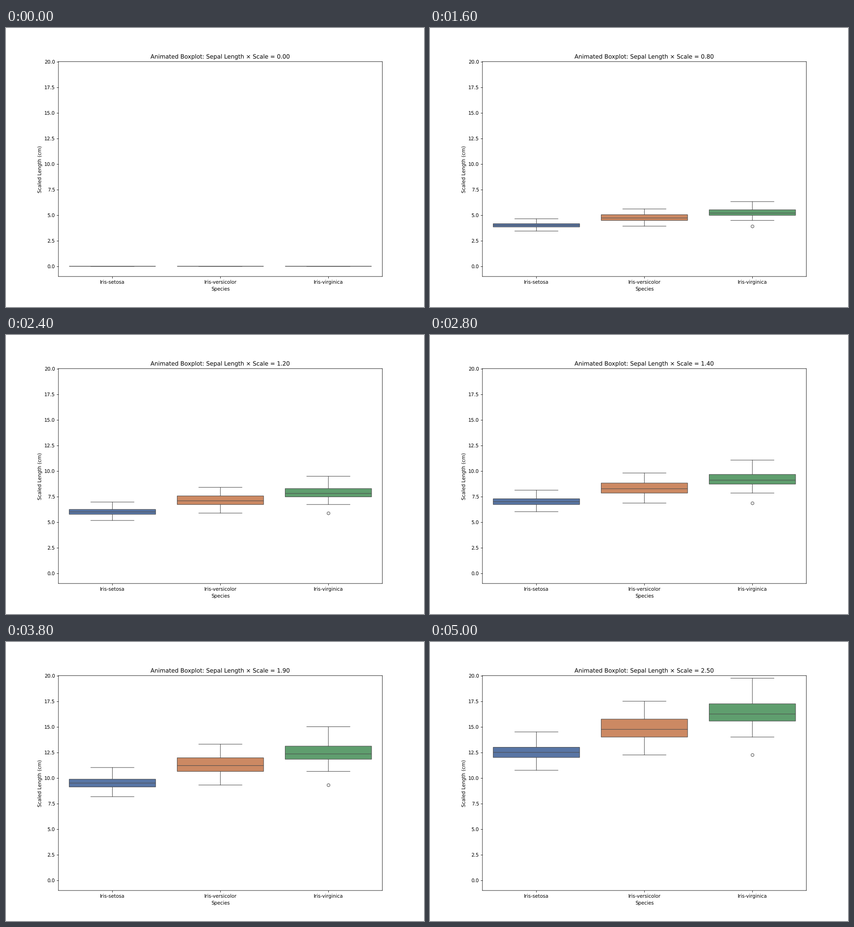
Animation of 917x611 px, one loop 8000 ms. Source, as a matplotlib script:

```python
import matplotlib.pyplot as plt
from matplotlib.animation import FuncAnimation

DPI = 76.4
FRAMES, INTERVAL = 80, 100
GROWTH_FRAMES, SCALE_STEP = 50, 0.05
INK = "#4c4c4c"
DX, DY = 0.38 / 917, -0.38 / 611  # small right and down shift of the axes

# name, fill, (low whisker, q1, median, q3, high whisker), outliers
SPECIES = [
    ("Iris-setosa", "#5875a4", (4.3, 4.8, 5.0, 5.2, 5.8), []),
    ("Iris-versicolor", "#cc8963", (4.9, 5.6, 5.9, 6.3, 7.0), []),
    ("Iris-virginica", "#5f9e6e", (5.6, 6.225, 6.5, 6.9, 7.9), [4.9]),
]
STAT_KEYS = ("whislo", "q1", "med", "q3", "whishi")

plt.rcParams["font.family"] = "DejaVu Sans"
plt.rcParams["text.hinting"] = "no_hinting"
fig, ax = plt.subplots(figsize=(917 / DPI, 611 / DPI), dpi=DPI)
fig.subplots_adjust(left=0.125 + DX, right=0.9 + DX,
                    bottom=0.11 + DY, top=0.88 + DY)
ax.set_xlim(-0.5, 2.5)
ax.set_ylim(-1, 20)
ax.set_xticks(range(len(SPECIES)), [name for name, *_ in SPECIES])
ax.set_xlabel("Species")
ax.set_ylabel("Scaled Length (cm)")
title = ax.set_title("")
for spine in ax.spines.values():
    spine.set_snap(False)

drawn = []


def scaled_stats(scale):
    stats = []
    for _, _, values, outliers in SPECIES:
        entry = {key: v * scale for key, v in zip(STAT_KEYS, values)}
        # With no spread there are no outliers
        entry["fliers"] = [v * scale for v in outliers] if scale > 0 else []
        stats.append(entry)
    return stats


def update(i):
    scale = min(i, GROWTH_FRAMES) * SCALE_STEP
    while drawn:
        drawn.pop().remove()

    line = dict(color=INK, linewidth=1.0)
    parts = ax.bxp(
        scaled_stats(scale),
        positions=range(len(SPECIES)),
        widths=0.8,
        patch_artist=True,
        manage_ticks=False,
        boxprops=dict(edgecolor=INK, linewidth=1.0),
        medianprops=dict(line, solid_capstyle="butt"),
        whiskerprops=line,
        capprops=line,
        flierprops=dict(marker="o", markersize=6, markerfacecolor="none",
                        markeredgecolor=INK, markeredgewidth=1.0),
    )
    for box, (_, fill, *_) in zip(parts["boxes"], SPECIES):
        box.set_facecolor(fill)
    for artists in parts.values():
        drawn.extend(artists)
    for artist in drawn:
        artist.set_snap(False)

    title.set_text(f"Animated Boxplot: Sepal Length × Scale = {scale:.2f}")
    return drawn + [title]


anim = FuncAnimation(fig, update, frames=FRAMES, interval=INTERVAL,
                     repeat=True, repeat_delay=0)
plt.show()
```
